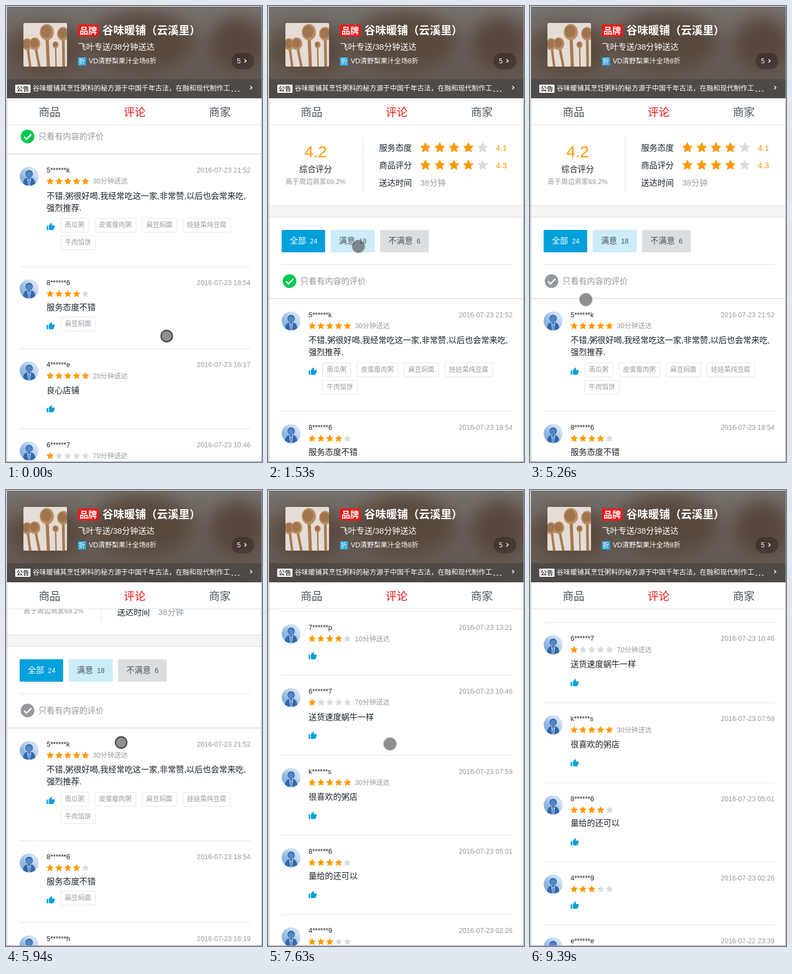
An HTML page that plays this animation: 470x835 px, repeating every 9.79 s.

```html
<!DOCTYPE html>
<html lang="zh-CN">
<head>
<meta charset="utf-8">
<style>
html, body { margin: 0; width: 100%; height: 100%; overflow: hidden; background: #fff; }
svg { display: block; width: 470px; height: 835px; font-family: "Liberation Sans", "Noto Sans CJK SC", "Noto Sans CJK", sans-serif; }
text { white-space: pre; }
</style>
</head>
<body>
<svg id="stage" viewBox="0 0 470 835" xmlns="http://www.w3.org/2000/svg"></svg>
<script>
const LOOP = 9790, STEP = 127;
const INK = '#18212a', SLATE = '#4d555d', GREY = '#93999f', BLUE = '#00a0dc', GOLD = '#ff9900', RULE = '#e3e5e7';

// The list is flung up and down; every move eases on from where the last one ended.
const flings = [
  { from: -140, to: 560, pos: [-20.5] },
  { from: 630, to: 1100, pos: [0] },
  { from: 5500, to: 6720, pos: [522] },
  { from: 6640, to: 7610, pos: [931.5] },
  { from: 7640, to: 8380, pos: [1028] }
];
const moves = [
  { from: -100, to: 190, pos: [290, 690], drag: true },
  { from: 200, to: 630, pos: [220, 480] },
  { from: 1200, to: 1530, pos: [166, 440] },
  { from: 1900, to: 2270, pos: [258, 441] },
  { from: 2660, to: 3510, pos: [72.5, 433.5] },
  { from: 3780, to: 4500, pos: [44.5, 505.5] },
  { from: 5010, to: 5500, pos: [208, 596] },
  { from: 5580, to: 6000, pos: [213, 400], drag: true },
  { from: 6070, to: 6600, pos: [213, 540] },
  { from: 6700, to: 7050, pos: [222, 370], drag: true },
  { from: 7100, to: 7480, pos: [224, 465] },
  { from: 7760, to: 8250, pos: [226, 370], drag: true }
];
const taps = [1780, 2540, 3550, 4820];

const reviews = [
  { user: '5******k', date: '07-23 21:52', stars: 5, mins: 30, text: ['不错,粥很好喝,我经常吃这一家,非常赞,以后也会常来吃,', '强烈推荐.'],
    tags: [['南瓜粥', '皮蛋瘦肉粥', '扁豆焖面', '娃娃菜炖豆腐'], ['牛肉馅饼']] },
  { user: '8******6', date: '07-23 18:54', stars: 4, text: ['服务态度不错'], tags: [['扁豆焖面']] },
  { user: '5******h', date: '07-23 16:19', stars: 3 },
  { user: '4******e', date: '07-23 16:17', stars: 5, mins: 20, text: ['良心店铺'] },
  { user: '7******p', date: '07-23 13:21', stars: 4, mins: 10 },
  { user: '6******7', date: '07-23 10:46', stars: 1, mins: 70, text: ['送货速度蜗牛一样'], bad: true },
  { user: 'k******s', date: '07-23 07:59', stars: 5, mins: 30, text: ['很喜欢的粥店'] },
  { user: '8******6', date: '07-23 05:01', stars: 4, text: ['量给的还可以'] },
  { user: '4******9', date: '07-23 02:26', stars: 3 },
  { user: 'e******e', date: '07-22 23:39', stars: 4 },
  { user: 'w******r', date: '07-22 01:26', stars: 3, text: ['发票开的不对'], bad: true }
];

// y is the vertical middle of the line of text
const txt = (x, y, s, size, fill, more = '') =>
  `<text x="${x}" y="${y + size * 0.36}" font-size="${size}" fill="${fill}" ${more}>${s}</text>`;
const rect = (x, y, w, h, fill, more = '') =>
  `<rect x="${x}" y="${y}" width="${w}" height="${h}" fill="${fill}" ${more}/>`;
const oval = (x, y, rx, ry, fill) => `<ellipse cx="${x}" cy="${y}" rx="${rx}" ry="${ry}" fill="${fill}"/>`;
const arrow = (x, y) => `<path d="M${x - 1.7} ${y - 3}l3.2 3-3.2 3" fill="none" stroke="#fff" stroke-width="1.5"/>`;
const middle = 'text-anchor="middle"', bold = 'font-weight="700"';

function star(x, y, r, fill) {
  const pts = Array.from({ length: 10 }, (_, i) => {
    const a = i * Math.PI / 5, d = i % 2 ? r * 0.48 : r;
    return (x + d * Math.sin(a)).toFixed(2) + ',' + (y - d * Math.cos(a)).toFixed(2);
  });
  return `<polygon points="${pts.join(' ')}" fill="${fill}" stroke="${fill}" stroke-width="${r * 0.12}" stroke-linejoin="round"/>`;
}
const starRow = (x, y, r, gap, n) =>
  [0, 1, 2, 3, 4].map(i => star(x + i * gap, y + r * 0.06, r, i < n ? GOLD : '#d9dbdf')).join('');

const spoon = (x, y, r, foot) =>
  `<path d="M${x} ${y}L${foot} 84" stroke="#a67a50" stroke-width="${r * 0.45}"/>`
  + oval(x, y, r, r * 1.15, '#b98d64') + oval(x - r * 0.1, y - r * 0.1, r * 0.75, r * 0.85, '#a0744c');

const defs = `<defs>
  <clipPath id="body"><rect x="2" y="218" width="467" height="616"/></clipPath>
  <clipPath id="head"><rect x="2" y="1" width="467" height="168"/></clipPath>
  <clipPath id="photo"><rect width="80" height="80" rx="2.5"/></clipPath>
  <clipPath id="disc"><circle r="17.5"/></clipPath>
  <filter id="soft" x="-30%" y="-30%" width="160%" height="160%"><feGaussianBlur stdDeviation="16"/></filter>
  <linearGradient id="wall" x2="0" y2="1"><stop stop-color="#77736f"/><stop offset=".45" stop-color="#685f59"/><stop offset="1" stop-color="#615750"/></linearGradient>
  <linearGradient id="sky" x1="0" y1="1" x2="1" y2="0"><stop offset=".3" stop-color="#8cb3e0"/><stop offset=".75" stop-color="#cfe0f3"/></linearGradient>
  <g id="face" clip-path="url(#disc)"><circle r="17.5" fill="url(#sky)"/>
    <path d="M-11.5 18C-11.5 6-8 2.5 0 2.5S11.5 6 11.5 18Z" fill="#3268ab"/>
    <path d="M-3.5 3L0 6 3.5 3 2 17H-2Z" fill="#b9d2ee"/><path d="M-1.3 6H1.3L2 15 0 17-2 15Z" fill="#5b90cc"/>
    <circle cy="-4.5" r="6.8" fill="#3268ab"/><circle cy="-3.6" r="5.4" fill="#5288c6"/></g>
  <path id="thumb" fill="${BLUE}" transform="translate(-8 -7.6) scale(.67)"
    d="M1 21h4V9H1zM23 10a2 2 0 0 0-2-2h-6.3l1-4.9-1.5-2.1L7.6 7.6A2 2 0 0 0 7 9v10a2 2 0 0 0 2 2h9a2 2 0 0 0 1.8-1.2l3-7.1z"/>
</defs>`;

const header = `<g clip-path="url(#head)">${rect(2, 1, 467, 168, 'url(#wall)')}
  <g filter="url(#soft)">${oval(75, 80, 70, 45, '#5a483d')}${oval(250, 65, 95, 55, '#59483d')}${oval(425, 70, 50, 50, '#58473c')}</g>
  ${rect(2, 134, 467, 35, INK, 'opacity=".25"')}</g>
  <g transform="translate(32 31)" clip-path="url(#photo)">${rect(0, 0, 80, 80, '#e4dcd5')}
    ${spoon(7, 39, 9.5, 13)}${spoon(21, 38, 10, 30)}${spoon(43, 17, 13, 46)}${spoon(59, 40, 5.5, 60)}${spoon(73, 20, 11, 74)}</g>
  ${rect(132, 34, 38, 22, '#f01818', 'rx="1.5"')}${txt(135, 45, '品牌', 16, '#fff', bold)}
  ${txt(177, 45, '谷味暖铺（云溪里）', 20, '#fff', bold)}
  ${txt(132, 74.5, '飞叶专送/38分钟送达', 15, '#fff')}
  ${rect(132, 94, 15, 15, '#2fa5dc')}${txt(133.5, 101.5, '折', 12, '#fff')}
  ${txt(152, 100, 'VD清野梨果汁全场8折', 12.5, '#fff')}
  ${rect(414, 86, 42, 30, '#000', 'rx="15" opacity=".25"')}${txt(424, 100.5, '5', 12.5, '#fff')}${arrow(439.5, 100.5)}
  ${rect(17, 144, 28, 15, '#fff', 'rx="1"')}${txt(19.5, 151.5, '公告', 11.5, '#444', bold)}
  ${txt(49, 150.5, '谷味暖铺其烹饪粥料的秘方源于中国千年古法，在融和现代制作工', 12.5, '#fff')}
  ${txt(412, 150.5, '…', 18.75, '#fff')}${arrow(450, 149.5)}
  ${rect(2, 169, 467, 49, '#fff')}${rect(2, 217, 467, 1, '#e1e3e5')}
  ${['商品', '评论', '商家'].map((s, i) => txt(80 + i * 156.3, 194.5, s, 20, i === 1 ? '#f01414' : SLATE, middle)).join('')}`;

const overview = txt(87.5, 266.5, '4.2', 30, GOLD, middle)
  + txt(87.5, 298.5, '综合评分', 15, INK, middle)
  + txt(87.5, 321.5, '高于周边商家69.2%', 12.5, GREY, middle)
  + rect(174, 241, 1, 100, RULE)
  + [['服务态度', '4.1'], ['商品评分', '4.3']].map(([s, v], i) => {
      const y = 259.5 + i * 32;
      return txt(204, y, s, 15, INK) + starRow(289, y - 0.5, 9.3, 26.3, 4) + txt(418, y, v, 15, GOLD);
    }).join('')
  + txt(204, 323.5, '送达时间', 15, INK) + txt(279.5, 323.5, '38分钟', 15, GREY)
  + rect(2, 365, 467, 22, '#f3f5f7') + rect(2, 365, 467, 1, '#dcdfe1') + rect(2, 386, 467, 1, '#dcdfe1')
  + rect(25, 473, 424, 1, RULE) + rect(2, 535, 467, 1.6, '#dfe1e3');

function button(x, w, label, count, on, idle, active) {
  const fill = on ? '#fff' : SLATE, weight = on ? 'font-weight="500"' : '';
  return rect(x, 410, w, 41, on ? active : idle, 'rx="1.5"')
    + txt(x + 15, 430, label, 15, fill, weight) + txt(x + 22 + label.length * 15, 430.5, count, 12.5, fill, weight);
}

function tagRow(row, top) {
  let x = 100.5;
  return row.map(tag => {
    const w = tag.length * 12 + 15.5;
    const s = rect(x, top, w, 25.5, 'none', `rx="1.5" stroke="${RULE}"`) + txt(x + 7.5, top + 12.5, tag, 12, GREY);
    x += w + 11.3;
    return s;
  }).join('');
}

function review(r, y) {
  const late = r.mins ? 2 : 0, lines = r.text || [], rows = r.tags || [];
  const extra = lines.length ? 22.5 * (lines.length - 1) + 29 : 0;
  const foot = y + 50 + late + extra;
  const height = 115 + late * 0.85 + extra + (lines.length ? 1 : 0) + (rows.length ? 32 * rows.length - 27 : 0);
  const svg = `<use href="#face" x="42.5" y="${y + 11.5}"/>` + txt(74.5, y, r.user, 12.5, INK)
    + txt(449, y, '2016-' + r.date, 12.5, GREY, 'text-anchor="end"') + starRow(81, y + 20.5, 6.4, 16.2, r.stars)
    + (r.mins ? txt(159.5, y + 20.5, r.mins + '分钟送达', 12.5, GREY, 'font-weight="300"') : '')
    + lines.map((line, i) => txt(74.5, y + 44.8 + late + i * 22, line, 15, INK)).join('')
    + `<g transform="translate(82 ${foot})"><use href="#thumb"/></g>`
    + rows.map((row, i) => tagRow(row, Math.round(foot - 16) + 0.5 + i * 32)).join('')
    + rect(25, y + height - 29.6, 424, 1.1, RULE);
  return { svg, height };
}

function content(filter, only) {
  let s = overview
    + button(25, 80, '全部', 24, filter === 'all', '#ccecf8', BLUE)
    + button(115, 81, '满意', 18, filter === 'good', '#ccecf8', BLUE)
    + button(206, 89, '不满意', 6, filter === 'bad', '#dbdddf', SLATE)
    + `<circle cx="39.5" cy="503.8" r="12.5" fill="${only ? '#00c850' : GREY}"/>
       <path d="M33 504.2l4.6 4.6 9-9.2" fill="none" stroke="#fff" stroke-width="2.6"/>`
    + txt(59.5, 503.5, '只看有内容的评价', 15, GREY);
  let y = 565.2;
  for (const r of reviews) {
    if (only && !r.text || filter === 'good' && r.bad || filter === 'bad' && !r.bad) continue;
    const item = review(r, y);
    s += item.svg;
    y += item.height;
  }
  return s;
}

const stage = document.getElementById('stage');
stage.innerHTML = defs + rect(0, 0, 470, 835, '#fff') + '<g clip-path="url(#body)"><g id="list"></g></g>' + header
  + rect(1, 0, 1, 835, '#a3a3a3') + rect(469, 0, 1, 835, '#a3a3a3') + rect(0, 834, 470, 1, '#a3a3a3')
  + `<g id="touch"><circle r="13" fill="none" stroke="#d8d8d8" stroke-dasharray="2 1.5"/>
     <circle r="11.8" fill="#444" fill-opacity=".6"/><circle id="ring" r="10.2" fill="none" stroke="#1c1c1c" stroke-width="1.1"/></g>`;
const [list, touch, ring] = ['list', 'touch', 'ring'].map(id => document.getElementById(id));

const ease = p => p * p * (3 - 2 * p);
function follow(path, first, t) {
  return path.reduce((at, m) => {
    const p = ease(Math.min(1, Math.max(0, (t - m.from) / (m.to - m.from))));
    return at.map((v, i) => v + (m.pos[i] - v) * p);
  }, first);
}

let shown = '';
function draw(now) {
  const t = Math.floor((now % LOOP + 10) / STEP) * STEP;
  const filter = t < 1890 || t >= 3780 ? 'all' : t < 2660 ? 'good' : 'bad';
  const only = t < 4940;
  if (shown !== filter + only) {
    shown = filter + only;
    list.innerHTML = content(filter, only);
  }
  list.setAttribute('transform', `translate(0 ${-follow(flings, [298, 0], t)[0]})`);
  const [x, y] = follow(moves, [297, 572], t);
  touch.setAttribute('transform', `translate(${x} ${y})`);
  touch.setAttribute('visibility', t < 8250 ? 'visible' : 'hidden');
  const down = taps.some(a => t >= a - 60 && t < a + 100) || moves.some(m => m.drag && t >= m.from && t < m.to);
  ring.setAttribute('opacity', down ? 1 : 0);
}

const start = performance.now();
function loop() {
  draw(performance.now() - start);
  requestAnimationFrame(loop);
}
loop();
</script>
</body>
</html>
```
